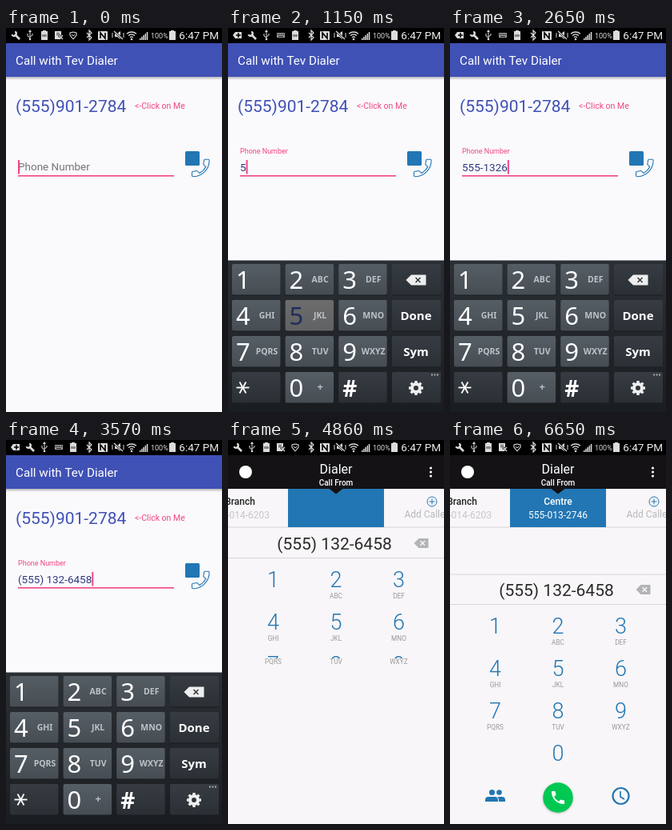
Recreate the animation shown at these times as an HTML page with a canvas. Size 270x480 px, loop 6.73 s.

```html
<!DOCTYPE html>
<html lang="en">
<head>
<meta charset="utf-8">
<title>Dialer demo</title>
<style>
html, body { margin: 0; width: 100%; height: 100%; overflow: hidden; background: #000; }
canvas { display: block; width: 100vw; height: 100vh; }
</style>
</head>
<body>
<canvas id="stage"></canvas>
<script>
const W = 270, H = 480, LOOP = 6730;
const STATUS = 19, BAR = 61, KEYS_TOP = 290.5;
const canvas = document.getElementById('stage');
const ctx = canvas.getContext('2d');

const SANS = 'Roboto, sans-serif', KEYS = '"Noto Sans", "Open Sans", sans-serif';
const INDIGO = '#3f51b5', PINK = '#f04586', BLUE = '#2276b3';
const PAPER = '#faf9fc', DIAL_PAPER = '#f8f6f8', HEADER = '#141215';

const HANDSET = new Path2D('M6.62 10.79c1.44 2.83 3.76 5.14 6.59 6.59l2.2-2.2c.27-.27.67-.36 1.02-.24 ' +
  '1.12.37 2.33.57 3.57.57.55 0 1 .45 1 1V20c0 .55-.45 1-1 1-9.39 0-17-7.61-17-17 0-.55.45-1 1-1h3.5' +
  'c.55 0 1 .45 1 1 0 1.25.2 2.45.57 3.57.11.35.03.74-.25 1.02l-2.2 2.2z');

// Typed digits with press and release times; the digit lands on release.
const TYPED = [
  ['5', 930, 1000], ['5', 1150, 1220], ['5', 1430, 1500],
  ['1', 1860, 1930], ['3', 2080, 2150], ['2', 2290, 2360],
  ['6', 2570, 2640], ['4', 2780, 2850], ['5', 3000, 3150], ['8', 3360, 3430]
];
const OPEN = 4150, READY = 4570, RELAYOUT = 5000, TAB_TEXT = 5080;

const clamp = v => Math.max(0, Math.min(1, v));
const span = (t, from, to) => clamp((t - from) / (to - from));
const easeOut = p => 1 - (1 - p) ** 2.5;
const mix = (a, b, p) => a + (b - a) * p;

function rect(x, y, w, h, color) {
  ctx.fillStyle = color;
  ctx.fillRect(x, y, w, h);
}

function box(x, y, w, h, r, color) {
  ctx.beginPath();
  ctx.roundRect(x, y, w, h, r);
  ctx.fillStyle = color;
  ctx.fill();
}

function disc(x, y, r, color) {
  ctx.beginPath();
  ctx.arc(x, y, r, 0, 7);
  ctx.fillStyle = color;
  ctx.fill();
}

function ring(x, y, r, color, width, from = 0, to = 7) {
  ctx.beginPath();
  ctx.arc(x, y, r, from, to);
  ctx.strokeStyle = color;
  ctx.lineWidth = width;
  ctx.stroke();
}

function trace(points) {
  ctx.beginPath();
  for (let i = 0; i < points.length; i += 2) ctx.lineTo(points[i], points[i + 1]);
}

function line(color, width, ...points) {
  trace(points);
  ctx.strokeStyle = color;
  ctx.lineWidth = width;
  ctx.stroke();
}

function poly(color, ...points) {
  trace(points);
  ctx.fillStyle = color;
  ctx.fill();
}

function text(str, x, y, size, color, { weight = 400, align = 'left', family = SANS } = {}) {
  ctx.font = `${weight} ${size}px ${family}`;
  ctx.textAlign = align;
  ctx.fillStyle = color;
  ctx.fillText(str, x, y);
}

function at(x, y, draw) {
  ctx.save();
  ctx.translate(x, y);
  draw();
  ctx.restore();
}

function shade(y0, y1, from, to) {
  const g = ctx.createLinearGradient(0, y0, 0, y1);
  g.addColorStop(0, from);
  g.addColorStop(1, to);
  return g;
}

function backspace(x, y, w, h, color, cross) {
  poly(color, x, y, x + h / 2, y - h / 2, x + w, y - h / 2, x + w, y + h / 2, x + h / 2, y + h / 2);
  const cx = x + w * 0.6, d = h * 0.23;
  line(cross, 1.5, cx - d, y - d, cx + d, y + d);
  line(cross, 1.5, cx - d, y + d, cx + d, y - d);
}

// Status bar

const GREY = '#dcdcdc';
const icons = {
  plus() {
    poly(GREY, -6, 0, -3, -4, 5, -4, 5, 4, -3, 4);
    line('#000', 1.5, -2, 0, 4, 0);
    line('#000', 1.5, 1, -3, 1, 3);
  },
  wrench() {
    line(GREY, 2.6, -1, -1, 5, 5);
    ring(-2, -2, 2.8, GREY, 2.2, -1.1, 2.7);
  },
  usb() {
    line(GREY, 1, 0, -5, 0, 5);
    line(GREY, 1, -3, -2, -3, 1, 0, 3);
    line(GREY, 1, 3, -2, 3, 0, 0, 2);
    disc(0, 5, 1.3, GREY);
    poly(GREY, -2, -4, 0, -7, 2, -4);
  },
  keyboard() {
    rect(-5, -3, 10, 6, '#999');
    for (let i = 0; i < 4; i++) rect(-4 + i * 2.3, -2, 1, 2, '#222');
    rect(-3, 1, 6, 1, '#222');
  },
  battery() {
    rect(-2, -6, 4, 2, GREY);
    rect(-4, -5, 8, 11, GREY);
  },
  charge() {
    icons.battery();
    rect(-3, -1, 6, 3, '#888');
  },
  note() {
    rect(-5, -5, 8, 10, GREY);
    rect(-3, -3, 4, 1, '#444');
    rect(-3, -1, 4, 1, '#444');
    line('#000', 3, 0, 0, 5, 5);
    line(GREY, 1.3, 0, 0, 5, 5);
    line(GREY, 1.3, 5, 0, 0, 5);
  },
  shield() {
    line(GREY, 1.1, 0, 5, -4, 0, -4, -3, 0, -4, 4, -3, 4, 0, 0, 5);
    line(GREY, 1, -2, -1, 0, 1, 2, -1);
  },
  bluetooth() {
    line(GREY, 1.2, -3, -3, 3, 3, 0, 6, 0, -6, 3, -3, -3, 3);
  },
  nfc() {
    box(-6, -5, 12, 11, 1, GREY);
    line('#000', 1.6, -3, 4, -3, -3, 3, 4, 3, -3);
  },
  mute() {
    poly(GREY, -4, -2, -1, -2, 3, -5, 3, 5, -1, 2, -4, 2);
    line('#000', 2.5, -5, -5, 6, 5);
    line(GREY, 1.2, -5, -5, 6, 5);
    line(GREY, 1, -7, -3, -7, 3);
    line(GREY, 1, 7, -3, 7, 3);
  },
  wifi() {
    for (const r of [3, 6, 9]) ring(0, 5, r, GREY, 1.3, -2.3, -0.85);
    disc(0, 5, 1.3, GREY);
  },
  signal() {
    for (let i = 0; i < 5; i++) rect(-5 + i * 2.2, 4 - i * 2, 1.5, 2 + i * 2, GREY);
  }
};

function statusBar(typing) {
  rect(0, 0, W, STATUS, '#000');
  const left = typing
    ? ['plus', 'wrench', 'usb', 'keyboard', 'charge']
    : ['wrench', 'usb', 'charge', 'note', 'shield'];
  left.forEach((name, i) => at(12 + i * 18, 9, icons[name]));
  ['bluetooth', 'nfc', 'mute', 'wifi', 'signal'].forEach((name, i) =>
    at([104, 121, 140, 157, 172][i], 9, icons[name]));
  text('100%', 181, 13, 9, '#ddd');
  at(208, 9, icons.battery);
  text('6:47 PM', 266, 13.5, 13.5, '#eee', { align: 'right' });
}

// Form screen

function format(d) {
  if (d.length < 4) return d;
  if (d.length < 8) return `${d.slice(0, 3)}-${d.slice(3)}`;
  return `(${d.slice(0, 3)}) ${d.slice(3, 6)}-${d.slice(6)}`;
}

const typedAt = t => format(TYPED.filter(k => t >= k[2]).map(k => k[0]).join(''));

function formScreen(t) {
  rect(0, STATUS, W, H, PAPER);
  rect(0, BAR, W, 4, shade(BAR, BAR + 4, 'rgba(0,0,0,.28)', 'rgba(0,0,0,0)'));
  rect(0, STATUS, W, BAR - STATUS, INDIGO);
  text('Call with Tev Dialer', 12, 45.5, 15.2, '#fff');
  text('(555)901-2784', 12, 105, 21, INDIGO);
  text('<-Click on Me', 161, 101, 10.5, PINK);

  const p = easeOut(span(t, 70, 270));
  const tint = [[117, 240], [117, 69], [117, 134]].map(c => Math.round(mix(c[0], c[1], p)));
  text('Phone Number', 15, mix(178, 157, p), mix(13.5, 9, p), `rgb(${tint})`);
  rect(15, 184, 195, 1.6, PINK);

  const value = typedAt(t);
  text(value, 15, 178.5, 13.5, '#303a80');
  if (t < 140 || t >= 650) rect(15 + ctx.measureText(value).width, 165, 2, 17.5, PINK);

  box(224, 154, 18, 18, 1.5, BLUE);
  at(257.7, 160.6, () => {
    ctx.scale(-1.2, 1.2);
    ctx.fillStyle = PAPER;
    ctx.fill(HANDSET);
    ctx.strokeStyle = BLUE;
    ctx.lineWidth = 0.9;
    ctx.stroke(HANDSET);
  });
}

// Keyboard

const PAD = [
  ['1', '', '2', 'ABC', '3', 'DEF'],
  ['4', 'GHI', '5', 'JKL', '6', 'MNO'],
  ['7', 'PQRS', '8', 'TUV', '9', 'WXYZ'],
  ['*', '', '0', '+', '#', '']
];

function gear(x, y) {
  for (let i = 0; i < 8; i++) {
    const a = i * Math.PI / 4, c = Math.cos(a), s = Math.sin(a);
    line('#eee', 3.4, x + c * 5, y + s * 5, x + c * 9, y + s * 9);
  }
  ring(x, y, 5, '#eee', 4);
}

function keyFace(x, y, w, light, pressed) {
  box(x, y + 1, w, 38.5, 2, '#191c20');
  const fill = pressed ? shade(y, y + 38, '#6c6c6c', '#616264')
    : light ? shade(y, y + 38, '#565e65', '#464d53')
    : shade(y, y + 38, '#363c42', '#2b3035');
  box(x, y, w, 38.5, 2, fill);
}

function keyboard(t) {
  rect(0, KEYS_TOP, W, H - KEYS_TOP, shade(KEYS_TOP, H, '#2b3035', '#1a1d20'));
  const down = TYPED.find(k => t >= k[1] && t < k[2]);
  const opts = { family: KEYS };

  PAD.forEach((row, r) => {
    const y = 295 + r * 45;
    for (let c = 0; c < 3; c++) {
      const digit = row[c * 2], x = 5 + c * 66.6;
      const pressed = !!down && down[0] === digit;
      const symbol = digit === '*' || digit === '#';
      keyFace(x, y, 60.5, !symbol, pressed);
      if (digit === '*') {
        for (let i = 0; i < 6; i++) {
          const a = i * Math.PI / 3;
          line('#fff', 1.8, 18.5, y + 19.5, 18.5 + Math.cos(a) * 8, y + 19.5 + Math.sin(a) * 8);
        }
      } else {
        text(digit, x + 5, y + 30.5, symbol ? 28 : 31, pressed ? '#1f2c5c' : '#fff',
          { ...opts, weight: symbol ? 700 : 400 });
      }
      text(row[c * 2 + 1], x + 43.5, y + 23, digit === '0' ? 13 : 10.5, '#bcc3c8',
        { ...opts, weight: 600, align: 'center' });
    }
    keyFace(205, y, 61, false, false);
  });

  backspace(222.5, 315, 25, 13, '#eee', '#33383d');
  const label = { ...opts, weight: 600, align: 'center' };
  text('Done', 235, 365, 15, '#fff', label);
  text('Sym', 235, 410, 15, '#fff', label);
  gear(235, 450);
  for (let i = 0; i < 3; i++) rect(254 + i * 3.5, 432.5, 2, 2, '#aaa');
}

// Dialer screen

function people() {
  disc(-4, -4, 3.6, BLUE);
  disc(5, -4, 3.3, BLUE);
  box(1, 1.5, 11.5, 6, [4, 4, 0, 0], BLUE);
  box(-13, 0.5, 17.5, 7.5, [5, 5, 0, 0], DIAL_PAPER);
  box(-12.5, 1.5, 16, 6, [4, 4, 0, 0], BLUE);
}

function tabs(t) {
  rect(0, 108.5, W, 1, '#d8d6d8');
  rect(75, BAR, 120, 48, BLUE);
  poly(HEADER, 126, 60.5, 144, 60.5, 135, 67.5);

  const mid = { align: 'center' }, bold = { align: 'center', weight: 500 };
  text('Branch', 15, 81, 12, '#222', bold);
  text('555-014-6203', 15, 97.5, 12, '#c8c6c8', mid);
  if (t >= TAB_TEXT) {
    text('Centre', 135, 81, 12, '#fff', bold);
    text('555-013-2746', 135, 97.5, 12, '#fff', mid);
  }
  ring(255, 77, 6, BLUE, 1);
  line(BLUE, 1, 251.5, 77, 258.5, 77);
  line(BLUE, 1, 255, 73.5, 255, 80.5);
  text('Add Caller ID', 255, 97, 12, '#b9b9bb', mid);
}

function dialRow(r, digitY, labelY, clipY) {
  ctx.save();
  if (clipY) {
    ctx.beginPath();
    ctx.rect(0, 0, W, clipY);
    ctx.clip();
  }
  const cols = [56.5, 135, 213.5];
  cols.forEach((x, c) => {
    if (r < 3 || c === 1)
      text(PAD[r][c * 2], x, digitY, 27, BLUE, { weight: 300, align: 'center' });
  });
  ctx.restore();
  if (r < 3) cols.forEach((x, c) =>
    text(PAD[r][c * 2 + 1], x, labelY, 8.25, '#999', { align: 'center' }));
}

function dialerScreen(t) {
  const tight = t < RELAYOUT, dy = tight ? 0 : 58;
  rect(0, STATUS, W, H, DIAL_PAPER);
  rect(0, STATUS, W, BAR - STATUS, HEADER);
  disc(22, 40, 8, '#fff');
  text('Dialer', 135, 42, 16, '#fff', { align: 'center' });
  text('Call From', 135, 56.5, 10, '#fff', { align: 'center', weight: 500 });
  for (const y of [35, 40, 45]) disc(253.5, y, 1.6, '#fff');
  tabs(t);

  if (!tight) rect(0, 167.5, W, 1, '#d8d6d8');
  rect(0, 147 + dy, W, 1, '#d8d6d8');
  text(typedAt(t), 133, 137 + dy, 21, '#2a2a2a', { align: 'center' });
  backspace(232.5, 129 + dy, 18, 12, '#b3b3b5', DIAL_PAPER);

  for (let r = 0; r < 4; r++) {
    const base = 184 + dy + r * 53;
    if (!tight || r < 2) dialRow(r, base, base + 14.3);
    else if (r === 2) dialRow(r, 290, 280, 273);
  }
  if (tight) return;

  at(56.5, 444.5, people);
  ctx.save();
  ctx.shadowColor = 'rgba(0,0,0,.25)';
  ctx.shadowBlur = 3;
  ctx.shadowOffsetY = 1;
  disc(135, 447, 18.75, '#00c853');
  ctx.restore();
  at(124.2, 436.2, () => {
    ctx.scale(0.9, 0.9);
    ctx.fillStyle = '#fff';
    ctx.fill(HANDSET);
  });
  ring(213.5, 445, 10, BLUE, 2.2);
  line(BLUE, 1.7, 213, 439, 213, 446, 218, 449);
}

// The blank new window grows over the dimmed form.
function opening(t) {
  const p = easeOut(span(t, OPEN - 70, 4430));
  ctx.save();
  ctx.beginPath();
  ctx.rect(0, STATUS, W, H);
  ctx.clip();
  rect(0, STATUS, W, H, `rgba(0,0,0,${0.75 * p})`);
  ctx.globalAlpha = clamp(p * 1.3);
  const s = mix(0.85, 1, p);
  ctx.translate(135, 250);
  ctx.scale(s, s);
  rect(-135, STATUS - 250, W, H - STATUS, '#f2f2f2');
  ctx.restore();
}

function draw(t) {
  if (t < READY) formScreen(t);
  else dialerScreen(t);
  if (t >= OPEN && t < READY) opening(t);

  const shown = easeOut(span(t, 140, 420)) - span(t, 4600, 4830) ** 1.5;
  if (shown > 0) {
    ctx.save();
    ctx.translate(0, 190 * (1 - shown));
    keyboard(t);
    ctx.restore();
  }
  statusBar(t >= 280 && t < 4780);
}

function resize() {
  const ratio = window.devicePixelRatio || 1;
  canvas.width = Math.round(innerWidth * ratio);
  canvas.height = Math.round(innerHeight * ratio);
}

const start = performance.now();
function tick() {
  ctx.setTransform(canvas.width / W, 0, 0, canvas.height / H, 0, 0);
  draw((performance.now() - start) % LOOP);
  requestAnimationFrame(tick);
}

addEventListener('resize', resize);
resize();
tick();
</script>
</body>
</html>
```
